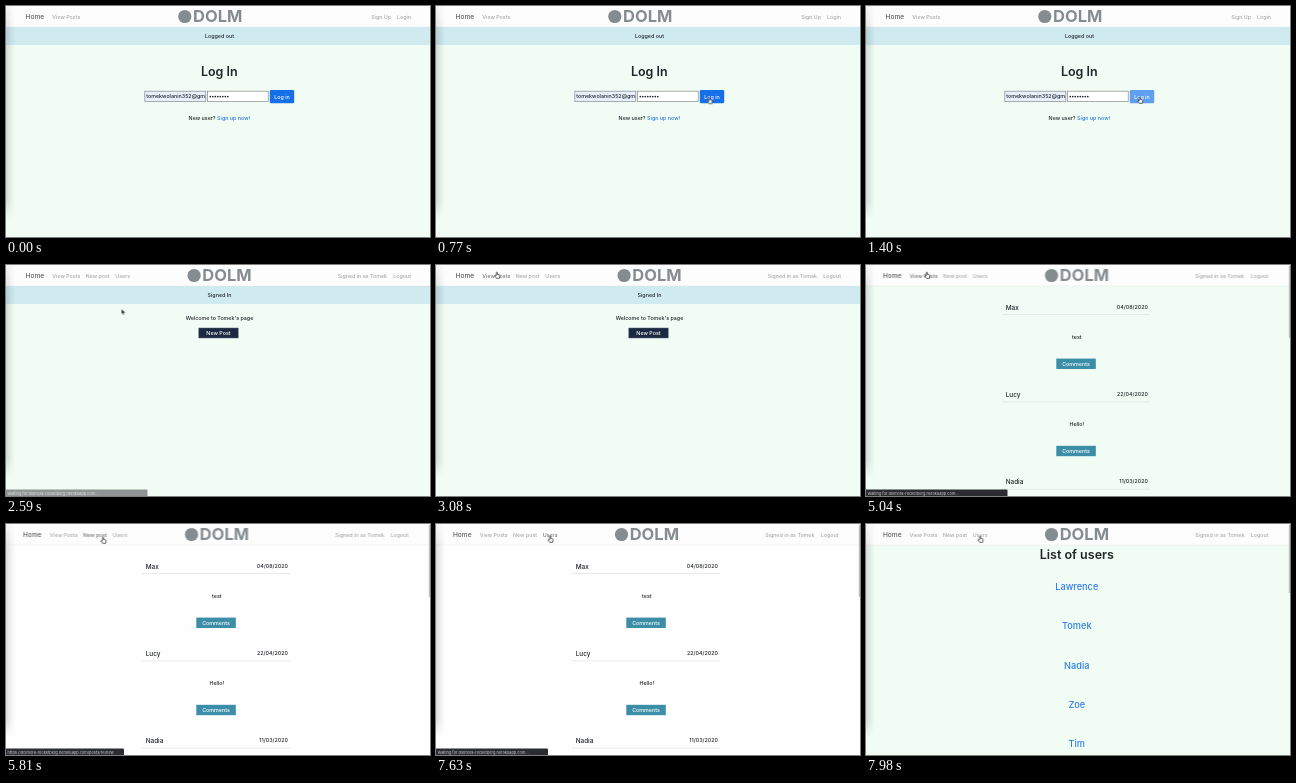
An HTML page for the animation above (8 s loop, 424x231 px).

```html
<!DOCTYPE html>
<html lang="en">
<head>
<meta charset="utf-8">
<title>Social site walkthrough</title>
<style>
html, body { margin: 0; width: 100%; height: 100%; overflow: hidden; background: #f1fcf5; }
svg { display: block; width: 424px; height: 231px; }
text { font: 500 5.35px Inter, "Liberation Sans", sans-serif; fill: #212529; white-space: pre; }
.mid { text-anchor: middle; }
.end { text-anchor: end; }
.nav { font-size: 5.3px; fill: #a6a8a8; }
.brand { font-size: 6.6px; fill: #5a5d5f; }
.mark { font-size: 16.5px; font-weight: 700; fill: #858c90; }
.h1 { font-size: 12.5px; font-weight: 600; }
.h3 { font-size: 9.2px; font-weight: 500; fill: #2f7fe6; }
.name { font-size: 6.4px; }
.white { fill: #fff; }
.link { fill: #2377d8; }
.status text { font-size: 3.85px; fill: #b4b5b8; }
.status rect { fill: #2b2c31; }

/* every part shares one 8 s clock; 1% is 80 ms */
.anim { animation: 8s step-end infinite; }
#page { animation-name: page; }
#login { animation-name: login; }
#home { animation-name: home; }
#member { animation-name: member; }
#posts { animation-name: posts; }
#users { animation-name: users; }
#submit { animation-name: submit; }
#toPosts { animation-name: to-posts; }
#toNew { animation-name: to-new; }
#toUsers { animation-name: to-users; }
#wait { animation-name: wait; animation-timing-function: linear; }
#wait rect { animation: wait-width 8s step-end infinite; }
#urlPosts { animation-name: url-posts; }
#urlNew { animation-name: url-new; }
#urlUsers { animation-name: url-users; }
#cursor { animation-name: move; animation-timing-function: ease-in-out; }
#hand { animation-name: hand; }
#arrow { animation-name: arrow; }

@keyframes page { 0% { fill: #f1fcf5 } 63.875% { fill: #fefefe } 98%, 100% { fill: #f1fcf5 } }
@keyframes login { 0% { opacity: 1 } 26.25%, 100% { opacity: 0 } }
@keyframes home { 0% { opacity: 0 } 26.25% { opacity: 1 } 54.25%, 100% { opacity: 0 } }
@keyframes member {
  0% { opacity: 0; transform: none }
  26.25% { opacity: 1; transform: none }
  54.25%, 100% { opacity: 1; transform: translateX(-2.6px) }
}
@keyframes posts { 0% { opacity: 0 } 54.25% { opacity: 1 } 98%, 100% { opacity: 0 } }
@keyframes users { 0% { opacity: 0 } 98%, 100% { opacity: 1 } }
@keyframes submit { 0% { fill: #146fe8 } 14%, 100% { fill: #5f9ff1 } }
@keyframes to-posts { 0% { fill: #a6a8a8 } 37.625% { fill: #707375 } 66.5%, 100% { fill: #a6a8a8 } }
@keyframes to-new { 0% { fill: #a6a8a8 } 70% { fill: #707375 } 77%, 100% { fill: #a6a8a8 } }
@keyframes to-users { 0% { fill: #a6a8a8 } 77% { fill: #707375 } 98%, 100% { fill: #a6a8a8 } }
@keyframes wait {
  0%, 19.24% { opacity: 0 }
  19.25%, 31.5% { opacity: 1 }
  33.25%, 48.12% { opacity: 0 }
  48.125%, 63.875% { opacity: 1 }
  65.6%, 84.87% { opacity: 0 }
  84.875%, 97.99% { opacity: 1 }
  98%, 100% { opacity: 0 }
}
@keyframes wait-width { 0% { width: 143.5px } 84.875%, 100% { width: 114px } }
@keyframes url-posts { 0% { opacity: 0 } 42.875% { opacity: 1 } 48.125%, 100% { opacity: 0 } }
@keyframes url-new { 0% { opacity: 0 } 70% { opacity: 1 } 77%, 100% { opacity: 0 } }
@keyframes url-users { 0% { opacity: 0 } 77% { opacity: 1 } 84.875%, 100% { opacity: 0 } }
@keyframes move {
  0%, 2.6% { transform: translate(254px, 104px) }
  10.5%, 26.24% { transform: translate(274px, 91px) }
  26.25%, 32.36% { transform: translate(232px, 82px) }
  32.37%, 33.25% { transform: translate(115.5px, 44px) }
  38.5%, 63.875% { transform: translate(61px, 7px) }
  71%, 74.375% { transform: translate(97.2px, 13px) }
  79.6%, 100% { transform: translate(114.3px, 12px) }
}
@keyframes hand { 0% { opacity: 0 } 7.9% { opacity: 1 } 26.25% { opacity: 0 } 37.625%, 100% { opacity: 1 } }
@keyframes arrow { 0% { opacity: 0 } 2.625% { opacity: 1 } 7.9% { opacity: 0 } 26.25% { opacity: 1 } 37.625%, 100% { opacity: 0 } }
</style>
</head>
<body>
<svg viewBox="0 0 424 231">
  <defs>
    <linearGradient id="edge"><stop stop-color="#000" stop-opacity=".13"/><stop offset=".5" stop-color="#000" stop-opacity=".06"/><stop offset="1" stop-color="#000" stop-opacity="0"/></linearGradient>
    <linearGradient id="fade" x2="0" y2="1"><stop stop-color="#fff" stop-opacity=".35"/><stop offset=".12" stop-color="#fff"/><stop offset=".92" stop-color="#fff"/><stop offset="1" stop-color="#fff" stop-opacity="0"/></linearGradient>
    <mask id="edgeMask"><rect width="10" height="213" fill="url(#fade)"/></mask>
    <g id="logo">
      <circle cx="6.8" cy="10.5" r="6.6" fill="#858c90"/>
      <text class="mark" x="15" y="16.4">DOLM</text>
    </g>
    <g id="banner"><rect y="21" width="424" height="18" fill="#cfebf0"/></g>
  </defs>

  <rect id="page" class="anim" width="424" height="231" fill="#f1fcf5"/>
  <rect width="424" height="21" fill="#fdfdfd"/>
  <rect y="20.7" width="424" height=".6" fill="#e6eae8"/>

  <g id="login" class="anim">
    <text class="brand" x="19.5" y="13">Home</text>
    <text class="nav" x="46.3" y="12.7">View Posts</text>
    <use href="#logo" x="172"/>
    <text class="nav end" x="385" y="12.7">Sign Up</text>
    <text class="nav end" x="405" y="12.7">Login</text>
    <use href="#banner"/>
    <text class="mid" x="213.5" y="32">Logged out</text>
    <text class="h1 mid" x="213.3" y="69.6">Log In</text>
    <rect x="138.8" y="85.2" width="61" height="10.2" fill="#e8f0fe" stroke="#85898c" stroke-width=".7"/>
    <svg x="139" y="85" width="60.3" height="11"><text x="1.2" y="7.3">tomekwolanin352@gmail.com</text></svg>
    <rect x="201.6" y="85.2" width="60.6" height="10.2" fill="#fff" stroke="#85898c" stroke-width=".7"/>
    <path d="M204.3 90.6h18" stroke="#212529" stroke-width="1.7" stroke-linecap="round" stroke-dasharray="0 2.5"/>
    <rect id="submit" class="anim" x="263.8" y="84" width="24.4" height="13.2" rx="1.3" fill="#146fe8"/>
    <text class="white mid" x="276" y="92.6">Log in</text>
    <text class="mid" x="213.4" y="114">New user? <tspan class="link">Sign up now!</tspan></text>
  </g>

  <g id="member" class="anim" opacity="0">
    <text class="brand" x="19.5" y="13">Home</text>
    <text id="toPosts" class="nav anim" x="46.3" y="12.7">View Posts</text>
    <text id="toNew" class="nav anim" x="79.7" y="12.7">New post</text>
    <text id="toUsers" class="nav anim" x="109.3" y="12.7">Users</text>
    <use href="#logo" x="181.3"/>
    <text class="nav end" x="381" y="12.7">Signed in as Tomek</text>
    <text class="nav end" x="405" y="12.7">Logout</text>
  </g>

  <g id="home" class="anim" opacity="0">
    <use href="#banner"/>
    <text class="mid" x="213.5" y="32">Signed In</text>
    <text class="mid" x="213.5" y="55.2">Welcome to Tomek's page</text>
    <rect x="192.8" y="63" width="39.4" height="10" fill="#1c2941" stroke="#56627a" stroke-width=".5"/>
    <text class="white mid" x="212.5" y="70">New Post</text>
  </g>

  <g id="posts" class="anim" opacity="0"><rect x="422.8" y="1" width="1.2" height="72" fill="#bfc1c1"/></g>
  <g id="users" class="anim" opacity="0">
    <rect x="422.8" y="1" width="1.2" height="68" fill="#bfc1c1"/>
    <text class="h1 mid" x="210.8" y="34.6">List of users</text>
  </g>

  <rect width="9" height="213" fill="url(#edge)" mask="url(#edgeMask)"/>
  <g id="bars"></g>

  <g id="cursor" class="anim" stroke="#222" stroke-linejoin="round">
    <path id="arrow" class="anim" d="M0 0v5.2l1.2-1 .8 1.8 1-.4-.8-1.8h1.6z" fill="#222" stroke="#fff" stroke-width=".35"/>
    <path id="hand" class="anim" d="M-.8 3.5V.6q.6-.9 1.2 0v1.8l2 .5q.6.2.5.9l-.5 2.5h-2.9l-1.8-2.4q.4-.8 1.5 0z" fill="#fff" stroke-width=".7"/>
  </g>
</svg>
<script>
const byId = id => document.getElementById(id);
const add = (id, markup) => byId(id).insertAdjacentHTML('beforeend', markup);

const posts = [['Max', '04/08/2020', 'test'], ['Lucy', '22/04/2020', 'Hello!'], ['Nadia', '11/03/2020', '']];
posts.forEach(([name, date, body], i) => add('posts', `
  <g transform="translate(0 ${i * 87.2})">
    <text class="name" x="139.7" y="44.8">${name}</text>
    <text class="end" x="282" y="44">${date}</text>
    <rect x="136" y="49.4" width="148" height=".6" fill="#dcdfdf"/>
    <text class="mid" x="210.8" y="73.5">${body}</text>
    <rect x="190.3" y="93.6" width="39.5" height="10.4" fill="#3b8da8"/>
    <text class="white mid" x="210" y="100.8">Comments</text>
  </g>`));

['Lawrence', 'Tomek', 'Nadia', 'Zoe', 'Tim'].forEach((name, i) =>
  add('users', `<text class="h3 mid" x="210.8" y="${66.2 + i * 39.2}">${name}</text>`));

const host = 'dolmora-rocketberg.herokuapp.com';
const bar = (id, width, label) => add('bars', `
  <g id="${id}" class="status anim" opacity="0">
    <rect x="-2" y="224.6" width="${width + 2}" height="9" rx="1"/>
    <text x="1.5" y="229.6">${label}</text>
  </g>`);
bar('wait', 141.5, `Waiting for ${host}...`);
bar('urlPosts', 94, `https://${host}/posts`);
bar('urlNew', 118, `https://${host}/posts/16/new`);
bar('urlUsers', 94, `https://${host}/users`);
</script>
</body>
</html>
```
